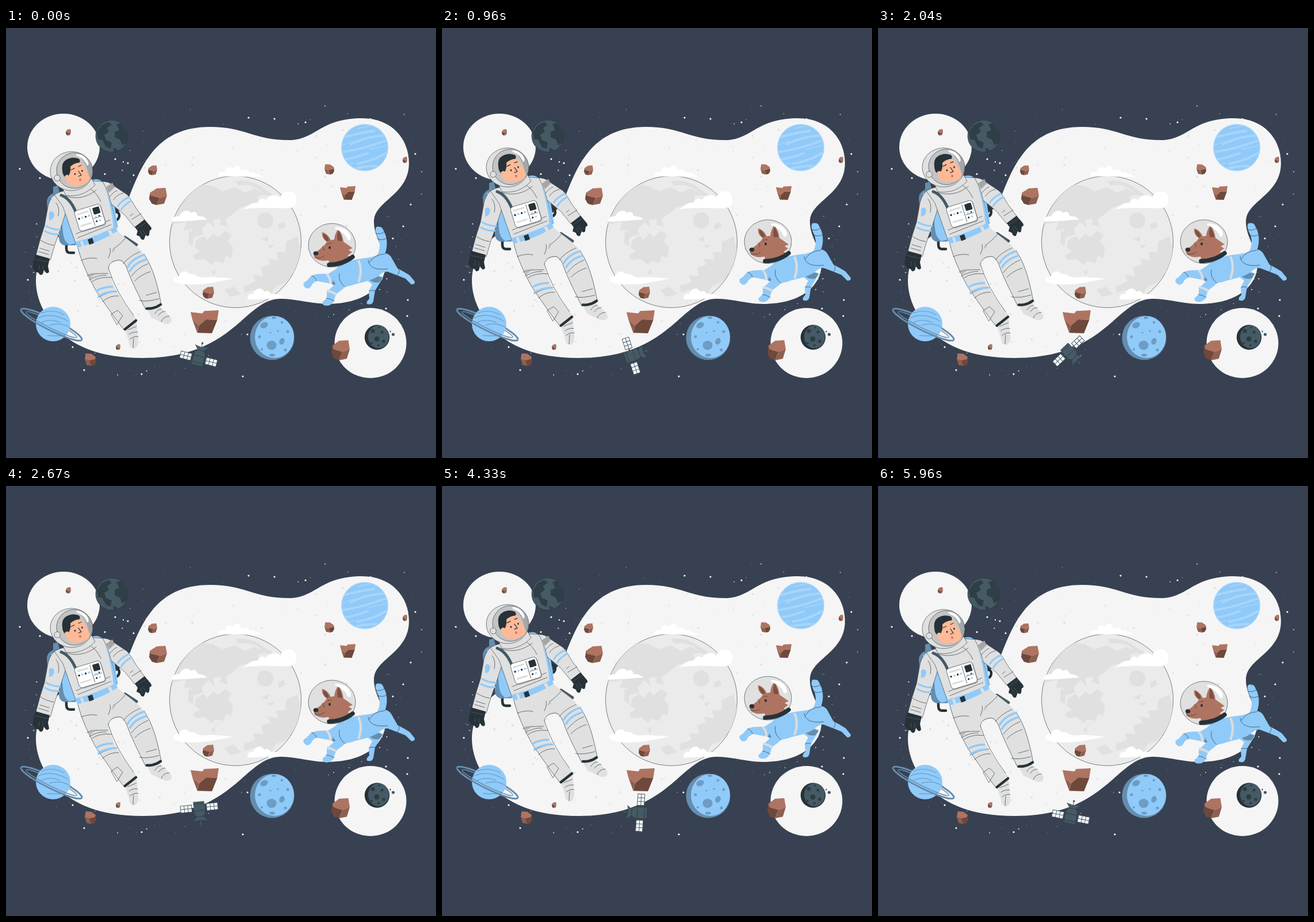
Recreate the animation shown at these times as an HTML page. Size 748x748 px, loop 6 s.

```html
<!DOCTYPE html>
<html lang="en">
<head>
<meta charset="utf-8">
<title>Space walk</title>
<style>
  html, body { margin: 0; width: 100%; height: 100%; overflow: hidden; background: #374151; }
  svg { display: block; width: 100vw; height: 100vh; }
  .paper { fill: #f5f5f5; }
  .white { fill: #fff; }
  .suit { fill: #e0e0e0; }
  .moon { fill: #ebebeb; }
  .grey { fill: #a6a6a6; }
  .glass { fill: #c4c4c4; }
  .blue { fill: #90caf9; }
  .pale { fill: #a8d5fa; }
  .shade { fill: #658dae; }
  .crater { fill: #6d9dc4; }
  .slate { fill: #455a64; }
  .ink { fill: #263238; }
  .fur { fill: #ae7461; }
  .furDark { fill: #7b5144; }
  .skin { fill: #ffb997; }
  .edge { stroke: #263238; stroke-width: .6; }
  .line { fill: none; stroke: #263238; stroke-width: .65; stroke-linecap: round; }
  .thick { fill: none; stroke: #263238; stroke-width: 4.5; stroke-linecap: round; }
  .band { fill: none; stroke: #90caf9; stroke-width: 3.5; }
  .cuff { fill: none; stroke: #dcdcdc; stroke-width: 4; }
  .ring { fill: none; stroke: #658dae; }
  .streak { fill: none; stroke: #6fa5d0; stroke-width: 1.4; stroke-linecap: round; }
</style>
</head>
<body>
<svg viewBox="0 0 748 748">
  <defs>
    <path id="blob" d="M355 172C415 172 432 195 492 195C540 195 545 157 620 157C670 157 701 192 701 235C701 290 642 300 640 335C639 365 662 385 660 415C658 445 630 480 558 480C525 479 505 471 478 471C414 471 398 574 238 574C160 574 120 552 95 530C65 502 52 468 52 440C52 400 76 370 105 354C140 335 196 340 214 294C236 238 262 172 355 172Z"/>
    <clipPath id="inBlob"><use href="#blob"/></clipPath>
    <clipPath id="inMoon"><circle cx="399" cy="372" r="114.5"/></clipPath>
    <clipPath id="inGlass"><ellipse cx="119" cy="248" rx="31" ry="31"/></clipPath>
    <clipPath id="inEarth"><circle cx="184" cy="188" r="27.7"/></clipPath>
    <clipPath id="inGiant"><circle cx="624" cy="208" r="39.5"/></clipPath>
  </defs>

  <g id="stars" class="white"></g>
  <use href="#blob" class="paper"/>
  <ellipse class="paper" cx="100" cy="207" rx="63" ry="58"/>
  <ellipse class="paper" cx="634" cy="548" rx="62.5" ry="61"/>
  <g id="specks" class="suit" clip-path="url(#inBlob)"></g>

  <!-- moon and clouds -->
  <circle class="moon edge" cx="399" cy="372" r="114.5"/>
  <g class="suit" clip-path="url(#inMoon)">
    <path d="M338 272C316 288 298 314 288 342L314 337L309 352L322 350L327 364L344 359L340 351L352 338L363 348L360 334L374 332L372 342L386 346L382 332L398 321L408 312L440 302L438 292L452 290L432 279L416 287L398 277L377 284L360 275Z"/>
    <path d="M398 266Q425 262 444 277L466 291L453 292L436 278L420 273L404 274Z"/>
    <path d="M331 369L344 361L350 369L361 357L368 364L381 353L392 360L386 372L395 381L392 400L383 396L378 409L364 405L358 412L346 402L330 404L325 396L337 389L328 381Z"/>
    <circle cx="451" cy="335" r="14"/>
    <path d="M473 342L484 337L486 346L475 351ZM445 367L457 362L455 372ZM455 378L467 376L460 384ZM318 352L327 357L325 380L317 374Z"/>
    <path d="M487 372L507 362L514 390L505 420L486 443L470 449L459 466L440 470L430 455L415 461L414 449L434 441L429 430L447 432L444 417L460 411L455 401L474 404L470 390L486 390Z"/>
    <path d="M380 455L396 450L409 463L390 468ZM356 424L365 419L363 430Z"/>
  </g>
  <g class="white">
    <path d="M369 258C370 249 376 249 381 251C382 241 391 240 394 245C401 236 408 240 410 248C420 244 423 249 424 252C433 251 440 255 446 259Z"/>
    <path d="M406 317C425 312 420 303 438 304C440 296 448 295 452 299C460 287 474 290 478 296C478 284 496 280 503 289C507 300 506 312 494 313C470 315 430 310 406 317Z"/>
    <path d="M289 337C288 327 296 328 302 327C304 318 318 314 322 322C328 317 333 322 333 327C342 327 349 331 350 333C330 335 310 336 289 337Z"/>
    <path d="M291 438C290 432 297 431 301 433C300 423 315 420 319 428C330 426 332 434 342 434C360 432 380 435 396 436C375 440 350 446 330 446C312 447 294 445 291 438Z"/>
    <path d="M420 472C420 463 426 461 430 463C432 452 446 450 449 459C456 455 460 460 461 463C470 461 480 465 485 470C462 470 440 473 420 472Z"/>
  </g>

  <!-- planets -->
  <g>
    <circle class="slate" cx="184" cy="188" r="28"/>
    <path class="ink" clip-path="url(#inEarth)" opacity=".65" d="M158 181L166 169L178 163L184 168L176 174L179 181L171 186L174 195L184 199L182 210L174 207L167 194L160 194ZM192 167L201 165L212 182L211 199L202 204L198 194L189 190L189 181L197 177ZM186 208L195 212L188 216Z"/>
    <circle class="line" cx="184" cy="188" r="28"/>
  </g>
  <g>
    <circle class="pale" cx="624" cy="208" r="41"/>
    <circle class="blue" cx="624" cy="208" r="39.5"/>
    <g clip-path="url(#inGiant)" fill="none" stroke="#a8d5fa" stroke-linecap="round">
      <path stroke-width="4" d="M582 192Q605 184 640 179M600 202Q630 187 664 187M584 216Q620 211 660 196M583 230Q605 227 629 218M611 236Q640 231 660 218M600 247Q620 240 644 240"/>
      <path stroke-width="1.6" d="M612 175L638 169M584 204L604 197M632 211L662 204M589 238L606 235"/>
    </g>
  </g>
  <g>
    <g class="ring" transform="translate(79 516) rotate(26.5)">
      <path stroke-width="3" d="M-59 0A59 10 0 0 1 59 0"/>
      <path stroke-width="1.5" d="M-49 0A49 6 0 0 1 49 0"/>
    </g>
    <circle class="blue" cx="82" cy="515" r="30"/>
    <path class="streak" d="M62 496Q82 488 101 499M55 505Q78 493 108 510M62 512Q76 505 94 512M76 517Q94 511 111 521M72 535Q88 536 102 535"/>
    <g class="ring" transform="translate(79 516) rotate(26.5)">
      <path stroke-width="3" d="M-59 0A59 10 0 0 0 59 0"/>
      <path stroke-width="1.5" d="M-49 0A49 6 0 0 0 49 0"/>
    </g>
  </g>
  <g>
    <circle class="shade" cx="463" cy="539" r="38.5"/>
    <ellipse class="blue" cx="467" cy="537.5" rx="34" ry="36.5"/>
    <g class="crater">
      <ellipse cx="449" cy="517" rx="7" ry="5" transform="rotate(-25 449 517)"/>
      <ellipse cx="462" cy="552" rx="8.5" ry="8"/>
      <ellipse cx="480" cy="545" rx="4.5" ry="6" transform="rotate(25 480 545)"/>
      <ellipse cx="466" cy="504" rx="4" ry="2"/>
      <circle cx="480" cy="512" r="2.2"/><circle cx="490" cy="528" r="2.5"/>
      <circle cx="441" cy="537" r="2.5"/><circle cx="473" cy="527" r="1.6"/>
      <ellipse cx="463" cy="569" rx="5" ry="2.5"/><circle cx="486" cy="560" r="2.6"/>
      <circle cx="445" cy="559" r="2"/><circle cx="460" cy="530" r="1.4"/>
    </g>
  </g>
  <g>
    <circle class="ink" cx="645.5" cy="538" r="21.7"/>
    <ellipse class="slate" cx="648" cy="537" rx="18" ry="20"/>
    <g class="ink" opacity=".75">
      <circle cx="638" cy="527" r="3.5"/><circle cx="654" cy="529" r="2.5"/><circle cx="645" cy="541" r="4.5"/>
      <circle cx="657" cy="545" r="2.8"/><circle cx="648" cy="552" r="2"/><circle cx="636" cy="548" r="2"/><circle cx="649" cy="521" r="1.7"/>
    </g>
    <circle class="slate" cx="673.5" cy="533" r="2.6"/><circle class="slate" cx="668.5" cy="528" r="1.3"/>
  </g>
  <g id="rocks"></g>

  <!-- satellite, drawn around its pivot -->
  <g id="satellite">
    <path stroke="#37474f" stroke-width="2" d="M-13 8H13"/>
    <path class="white" stroke="#455a64" stroke-width="1" d="M-32.500 2H-13V14H-32.500ZM13 2H32.500V14H13ZM-32.500 8H-13M13 8H32.500M-26 2V14M-19.500 2V14M19.500 2V14M26 2V14"/>
    <path class="slate" d="M-9.500 19H9.500V2Q9 -4 5 -7L12 -15L0 -13L-12 -15L-5 -7Q-9 -4 -9.500 2Z"/>
    <path class="line" d="M-9.500 3H9.500M-5 -7H5M-9.500 15H9.500"/>
    <path stroke="#455a64" d="M0 -13V-20"/><circle class="slate" cy="-20" r="1.8"/>
  </g>

  <!-- dog -->
  <g class="bob">
    <path class="blue" d="M645 396C652 385 651 372 646 363C640 350 643 344 649 346C655 345 656 351 659 357C664 367 664 386 657 397Z"/>
    <path class="line" d="M643 357Q650 360 658 355M647 367Q655 370 662 366"/>
    <path class="shade" d="M562 428Q577 418 583 430L572 448Q560 444 562 428Z"/>
    <path class="blue" d="M638 425L656 434L642 457L639 475Q637 483 628 480Q626 476 632 471L631 458L637 446L629 440Z"/>
    <path class="shade" d="M635 429L655 434L650 442Q640 445 632 438Z"/>
    <path class="blue" d="M579 416L560 428C548 427 538 428 531 431L523 440C516 443 516 447 520 451C525 456 531 451 533 445L540 440L567 445Z"/>
    <path class="blue" d="M570 424C580 410 593 405 607 403C625 399 640 400 648 393C660 389 668 393 672 402L681 418L692 424L702 430L711 441Q712 446 705 446L695 436L680 430L664 424C655 423 651 430 642 435C630 441 617 443 606 446C598 450 590 448 586 454L574 463L570 476Q565 484 556 483Q549 482 551 476L558 470L558 459L573 445Q565 435 570 424Z"/>
    <path class="cuff" d="M613 404Q621 421 613 442M558 428Q565 435 564 445M558 457Q568 459 575 464"/>
    <path class="line" d="M632 408Q640 394 659 393M630 404Q632 423 664 419M580 427Q577 440 589 450M532 431Q539 434 540 440M683 419Q686 424 681 430M632 457Q638 456 642 457M557 470Q563 470 571 475"/>
    <ellipse class="suit edge" cx="567" cy="378" rx="41" ry="38"/>
    <path class="fur" d="M536 391Q545 387 551 380Q556 376 558 372Q548 365 550 355Q560 358 565 369L571 368Q572 358 578 349Q586 360 587 372Q596 380 594 392L596 400Q588 409 563 412L561 404Q549 407 540 402Q534 399 536 391Z"/>
    <path class="furDark" d="M578 352Q584 360 585 371L577 370Q575 362 578 352ZM552 357Q559 360 562 369L558 371Q551 365 552 357Z"/>
    <path class="fur" d="M586 371L603 383L596 386L602 390L594 396L601 399L586 404Z"/>
    <ellipse class="ink" cx="539" cy="392" rx="4.3" ry="3.6"/>
    <ellipse class="ink" cx="563" cy="382" rx="2" ry="2.6"/>
    <path class="line" d="M559 377Q562 373 566 375M538 399Q548 402 554 396M550 380Q554 383 553 387"/>
    <path d="M562 412Q587 411 603 398" fill="none" stroke="#263238" stroke-width="7.5" stroke-linecap="round"/>
    <path class="white" d="M574 346Q595 347 600 364Q600 371 595 369Q590 356 574 350Q570 347 574 346Z"/>
  </g>

  <!-- astronaut -->
  <g class="bob">
    <path class="thick" d="M118 391H111Q105 391 105 383V374M190 320Q197 319 197 327Q196 334 190 334"/>
    <path class="shade" d="M71 301Q73 288 89 286L112 295L121 378L101 378Q91 375 92 361L88 318L72 320Z"/>
    <path class="blue" d="M78 294Q85 289 101 290L124 374L110 377Q100 371 99 355L96 320L80 320ZM146 266Q158 260 166 266L178 280L189 310L195 347L183 350Z"/>
    <path class="shade" d="M82 276L90 274L94 288L82 289Z"/>
    <path d="M207 364L227 377" stroke="#455a64" stroke-width="5" stroke-linecap="round"/>

    <!-- legs -->
    <path class="suit" d="M193 352C208 367 228 377 240 394C255 414 264 448 270 481L243 490C233 469 221 446 214 428C209 411 201 401 189 407C183 409 177 410 178 417C182 443 196 470 229 508L206 526C187 502 171 478 157 458C144 434 132 410 125 382Z"/>
    <path class="suit" d="M207 525L227 511L230 543Q231 555 223 558Q214 557 214 546ZM246 491L267 484L286 503Q290 510 286 513Q279 517 273 513L253 504Z"/>
    <path class="line" d="M125 382C132 410 144 434 157 458C171 478 187 502 206 526M178 417C180 405 194 403 199 404C208 408 210 418 214 428C221 446 233 469 243 490M240 394C255 414 264 448 270 481M178 417Q190 458 222 500M141 431Q155 426 177 427M145 438Q160 429 174 430M150 441Q162 432 184 434M131 404Q145 398 158 401M160 469Q175 460 193 458M168 476Q180 465 196 466M204 410Q214 397 233 389M218 432Q229 417 247 410M224 440Q236 428 251 424M183 498L194 491L203 500L193 516ZM244 465L262 460M208 365Q197 378 187 384M178 400Q183 390 181 383M232 474Q245 477 266 471"/>
    <path class="line" d="M216 541Q224 535 230 537M214 533Q220 528 229 529M212 525Q220 522 227 519M221 556L222 540M265 500Q271 492 277 493M259 497Q263 489 270 489M270 511Q273 502 284 501"/>
    <path class="grey" d="M142 428Q152 425 160 426Q150 430 146 438ZM187 382L183 392L190 386Z" opacity=".55"/>
    <path class="band" d="M156 458Q169 450 186 450M160 467Q173 459 190 458M211 417Q219 401 242 394M215 424Q223 408 246 402"/>
    <path class="thick" d="M207 524L226 509M245 488Q258 489 269 481"/>

    <!-- arms -->
    <path class="suit edge" d="M164 267Q179 266 187 274L211 290Q219 300 226 313L242 335L224 347L207 326Q189 310 176 301Z"/>
    <path class="suit edge" d="M84 290Q74 300 72 316L67 344L59 369L51 399L77 404L85 377L95 349L106 314L99 289Z"/>
    <path class="blue" d="M75 321Q82 315 84 325Q82 335 75 334Z"/>
    <path class="grey" d="M174 277L185 269L189 277L179 287Z"/>
    <path class="band" d="M69 344Q80 351 95 351M67 353Q79 360 93 359M194 311Q199 301 215 294M200 317Q206 306 219 300" style="stroke-width:3"/>
    <path class="line" d="M59 383L75 388M57 389L74 394M60 369Q70 376 83 378M219 333L235 323M216 327L221 323M87 304Q94 312 91 327M187 299Q192 290 204 287M180 294Q188 284 193 283"/>
    <path class="ink" d="M51 394L76 401L73 414L75 424Q72 429 68 424L66 421L64 428Q59 432 57 426L51 424L46 417L48 405ZM224 346L241 333L252 346Q255 351 250 352L249 360Q247 364 243 360L240 368Q235 370 233 363L227 360L229 353Z"/>
    <path fill="none" stroke="#56656d" stroke-width=".7" d="M50 402L73 407M58 412L57 420M64 413L64 421M226 350L244 338M237 351L243 359M233 353L238 362"/>

    <!-- torso -->
    <path class="suit edge" d="M84 290Q96 283 105 283L153 266L168 267C180 287 187 318 192 347L122 377L99 311Z"/>
    <path class="blue" d="M173 280Q187 312 192 346L187 349Q184 314 173 280Z"/>
    <path d="M96 291Q111 296 121 319" fill="none" stroke="#455a64" stroke-width="5" stroke-linecap="round"/>
    <path class="line" d="M125 365L183 342M122 358L181 334M103 292Q132 302 157 282M148 281Q158 287 165 302M110 287Q124 292 146 281"/>
    <path class="blue" d="M121 372Q160 362 191 345L194 353Q165 372 124 382Z"/>
    <path class="suit" d="M129 371L133 370L136 379L132 380ZM177 353L182 351L186 358L181 361Z"/>
    <path class="ink" d="M142 368L150 365L153 374L145 377Z"/>
    <g transform="translate(118 319) rotate(-17)">
      <rect class="grey" x="1" y="1" width="47" height="38" rx="5"/>
      <rect class="white edge" width="47" height="37" rx="5"/>
      <rect class="ink" x="32" y="4" width="12" height="12" rx="1.5"/>
      <path class="line" d="M28 3V34M30 22H44"/>
      <path stroke="#dcdcdc" stroke-width="3" stroke-linecap="round" d="M5 7H23M5 28H22"/>
      <g class="ink"><circle cx="5" cy="15" r="1.7"/><circle cx="17" cy="15" r="1.7"/><circle cx="33" cy="28" r="1.6"/><circle cx="40" cy="20" r="1.3"/></g>
      <g class="blue"><circle cx="11" cy="15" r="1.7"/><circle cx="23" cy="15" r="1.7"/><circle cx="39" cy="28" r="1.6"/><circle cx="34" cy="20" r="1.3"/></g>
    </g>

    <!-- head -->
    <path class="suit edge" d="M98 278L104 291Q133 296 155 273L149 262Z"/>
    <ellipse class="suit edge" cx="114" cy="249" rx="37" ry="34"/>
    <ellipse class="glass edge" cx="119" cy="248" rx="31" ry="31"/>
    <g clip-path="url(#inGlass)">
      <path class="grey" d="M118 217Q141 229 145 262L134 278L152 270V217Z"/>
      <path class="skin" d="M103 252L110 238L127 232Q134 238 138 246L146 260Q146 267 140 270Q124 277 111 273Q102 266 103 252Z"/>
      <path class="ink" d="M98 248Q96 234 105 229Q115 223 126 227Q130 229 128 234Q118 235 112 241Q113 251 109 257L105 262Q98 256 98 248Z"/>
      <path class="skin" d="M102 258Q107 252 111 259Q110 266 105 265Z"/>
    </g>
    <ellipse class="ink" cx="120" cy="254" rx="1.3" ry="1.8"/>
    <ellipse class="ink" cx="132.500" cy="248.500" rx="1.3" ry="1.8"/>
    <path class="line" d="M113 247L119 244M126 241L131 239M126 249L131 256L126 258" style="stroke-width:1.2"/>
    <ellipse cx="129" cy="264" rx="1.8" ry="2.3" fill="#c77763"/>
    <path class="white" d="M123 219Q137 220 143 233Q145 240 141 239Q136 227 125 223Q120 220 123 219Z"/>
    <circle class="suit edge" cx="89" cy="261" r="5.3"/>
  </g>
</svg>
<script>
  const $ = id => document.getElementById(id);

  // Rocks: x, y, width, height; a negative width mirrors the shape.
  const chunk = [
    'M.05 .28L.42 .03L.92 0L1 .45L.6 .58L.1 .45Z',
    'M.05 .28L.1 .45L.6 .58L.42 1L.15 .92L0 .65Z',
    'M.6 .58L1 .45L.84 .92L.42 1Z'];
  const bowl = [
    'M0 .08L.42 .14L.48 .03L1 0L.95 .42L.55 .4L.3 .66L.07 .42Z',
    'M.3 .66L.55 .4L.95 .42L.76 1L.24 .98Z',
    'M.07 .42L.3 .66L.24 .98Z'];
  const tones = ['#ae7461', '#6f483c', '#8d5f50'];
  const rock = (shape, x, y, w, h) =>
    `<g transform="translate(${x} ${y}) scale(${w} ${h})">` +
    shape.map((d, i) => `<path d="${d}" fill="${tones[i]}"/>`).join('') + '</g>';
  const chunks = [
    [104, 176, 9, 11], [247, 239, 16, 17], [249, 278, 31, 30], [571, 237, -17, 18], [690, 224, 8, 11],
    [342, 450, 20, 21], [566, 543, 32, 35], [157, 566, -20, 22], [191, 550, 8, 10]];
  $('rocks').innerHTML = chunks.map(r => rock(chunk, ...r)).join('') +
    rock(bowl, 581, 275, 27, 24) + rock(bowl, 321, 491, 49, 40);

  // Stars: the bright ones by hand, the dust strewn along the edge of the cloud.
  let seed = 11;
  const rnd = () => (seed = seed * 16807 % 2147483647) / 2147483647;
  const dot = (x, y, r) => `<circle cx="${x.toFixed(1)}" cy="${y.toFixed(1)}" r="${r.toFixed(2)}"/>`;
  const bright = [
    [422, 156], [521, 164], [24, 245], [212, 235], [190, 228], [59, 261], [236, 602], [116, 555],
    [412, 606], [136, 595], [673, 366], [691, 345], [699, 473], [698, 501], [712, 219], [661, 488],
    [38, 438], [704, 307], [420, 533], [467, 158], [222, 256], [172, 254]];
  const edge = $('blob'), length = edge.getTotalLength();
  let dust = bright.map(([x, y]) => dot(x, y, 1.6)).join('');
  for (let i = 0; i < 170; i++) {
    const p = edge.getPointAtLength(rnd() * length);
    dust += dot(p.x + (rnd() - .5) * 75, p.y + (rnd() - .5) * 65, .4 + rnd() ** 3 * .9);
  }
  $('stars').innerHTML = dust;
  let specks = '';
  for (let i = 0; i < 300; i++) {
    specks += dot(50 + rnd() * 650, 160 + rnd() * 415, .5 + rnd() ** 2 * 1.5);
  }
  $('specks').innerHTML = specks;

  const floaters = document.querySelectorAll('.bob');
  function draw() {
    const t = performance.now() % 6000;
    const phase = t % 3000 / 1500;
    const lift = 10 * (1 - Math.abs(1 - phase));
    floaters.forEach(f => f.setAttribute('transform', `translate(0 ${-lift})`));
    $('satellite').setAttribute('transform', `translate(336.8 567.8) rotate(${14 + t * .06})`);
    requestAnimationFrame(draw);
  }
  draw();
</script>
</body>
</html>
```
